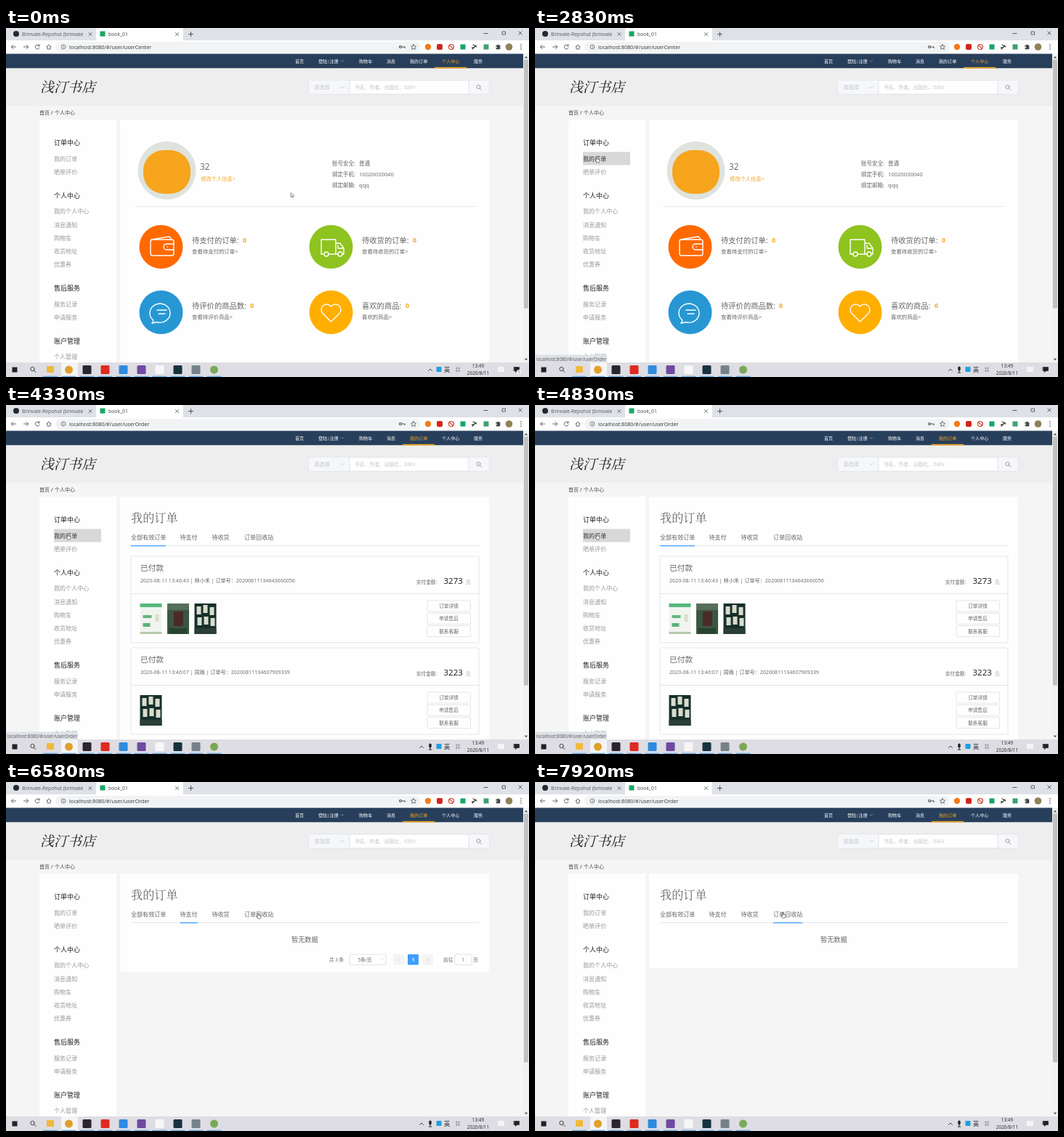
Write an HTML page that moves like this. It is 720 by 480 pixels and loops after 8000 ms.

```html
<!DOCTYPE html>
<html lang="zh-CN">
<head>
<meta charset="utf-8">
<title>书店个人中心</title>
<style>
html, body { margin: 0; width: 100%; height: 100%; overflow: hidden; }
svg { display: block; width: 720px; height: 480px; font-family: "Open Sans", "Noto Sans CJK SC", "Noto Sans CJK", sans-serif; }
text { white-space: pre; }
.serif { font-family: "Noto Serif CJK SC", "Noto Sans CJK SC", serif; }
</style>
</head>
<body>
<svg id="stage" viewBox="0 0 720 480"></svg>
<script>
const LOOP = 8000, STEP = 1000 / 12;
const PAGE = '#f5f5f5', PANEL = '#fefefe', LINE = '#dcdfe4', MUTED = '#999', GREY = '#666', INK = '#222', GOLD = '#f2a51e';

const rect = (x, y, w, h, fill, extra = '') => `<rect x="${x}" y="${y}" width="${w}" height="${h}" fill="${fill}" ${extra}/>`;
const frame = (x, y, w, h, stroke = LINE, r = 1) => rect(x, y, w, h, PANEL, `rx="${r}" stroke="${stroke}" stroke-width=".8"`);
const dot = (x, y, r, fill) => `<circle cx="${x}" cy="${y}" r="${r}" fill="${fill}"/>`;
const path = (d, stroke = '#555', width = .9, fill = 'none') =>
  `<path d="${d}" fill="${fill}" stroke="${stroke}" stroke-width="${width}" stroke-linecap="round" stroke-linejoin="round"/>`;
// y is the vertical middle of the glyphs
const text = (x, y, str, size, fill = INK, extra = '') =>
  `<text x="${x}" y="${(y + size * .37).toFixed(2)}" font-size="${size}" fill="${fill}" ${extra}>${str.replace(/</g, '&lt;')}</text>`;
const middle = 'text-anchor="middle"';
const group = (id, body) => `<g id="${id}">${body}</g>`;
const caret = (x, y, s = 2, c = MUTED) => path(`M${x - s} ${y - s / 2}l${s} ${s}l${s} ${-s}`, c, .7);
const cross = (x, y, s = 2) => path(`M${x - s} ${y - s}l${2 * s} ${2 * s}m0 ${-2 * s}l${-2 * s} ${2 * s}`, '#444', .8);
const lens = (x, y, r, c) => path(`M${x + r} ${y}a${r} ${r} 0 1 0 ${-2 * r} 0a${r} ${r} 0 1 0 ${2 * r} 0M${x + r * .7} ${y + r * .7}l${r} ${r}`, c);

function browser() {
  return rect(0, 0, 720, 17, '#dee1e6') + rect(124, 0, 120, 18, PANEL, 'rx="3"') + rect(0, 17, 720, 18.5, PANEL) +
    rect(68, 19, 503, 14, '#f1f3f4', 'rx="7"') +
    dot(14, 8, 4, '#24292e') + text(22, 8.5, 'Brinvale-Repohut (brinvale', 6.8, '#555') + cross(116, 8.5) +
    rect(129.5, 4.5, 7, 7, '#16a765') + text(141, 8.5, 'book_01', 6.8, '#444') + cross(235.5, 8.5) +
    path('M251.5 8.5h6m-3 -3v6', '#444') +
    path('M658 7.5h5', '#444') + path('M683.5 5h4v4h-4z', '#444', .8) + cross(708, 7, 2.2) +
    path('M13.5 26h-6m2.5 -2.7l-2.7 2.7l2.7 2.7') + path('M24.5 26h6m-2.5 -2.7l2.7 2.7l-2.7 2.7') +
    path('M45.8 24.4a3 3 0 1 0 .2 2.8M46 22.8v2h-2') + path('M56 26l3 -3l3 3M57 25.5v3.5h4v-3.5') +
    path('M82 26a3 3 0 1 0 -6 0a3 3 0 1 0 6 0M79 25.6v1.8M79 24.2v.1', '#666', .8) +
    path('M544.5 26a1.5 1.5 0 1 0 -3 0a1.5 1.5 0 1 0 3 0h4.5v1.5', '#555', 1.2) +
    path('M561 22.5l1.1 2.3l2.5 .3l-1.8 1.7l.5 2.5l-2.3 -1.2l-2.3 1.2l.5 -2.5l-1.8 -1.7l2.5 -.3z', '#555', .8) +
    dot(581, 26, 4.2, '#f57a18') + rect(593, 22, 8, 8, '#d3261c', 'rx="2"') +
    path('M616.5 26a3.5 3.5 0 1 0 -7 0a3.5 3.5 0 1 0 7 0M610.6 23.6l4.8 4.8', '#c8402c', 1.2) +
    rect(625.5, 22.5, 7, 7, '#12a866') + path('M642 29l5 -5m-4 -1l5 3M641.5 27h3', '#444', 1.3) +
    rect(657.5, 22.5, 7, 7, '#3f9f70') + path('M675 24h1.5a1 1 0 1 1 2 0h1.5v5h-5v-2a1 1 0 1 0 0 -1.5z', '#444', .6, '#444') +
    dot(692.5, 26, 4.8, '#8f8058') + [23, 26, 29].map(y => dot(709, y, .8, '#444')).join('');
}

function siteHeader() {
  const nav = [[398, '首页'], [430, '登陆|注册'], [486, '购物车'], [524, '消息'], [644, '服务']];
  return rect(0, 35.5, 712, 20, '#283f5c') + nav.map(([x, s]) => text(x, 45.5, s, 6.1, '#fff')).join('') +
    caret(463, 45.5, 1.7, '#a0a8b4') + rect(0, 55.5, 712, 51.5, '#eee') +
    text(47, 80.5, '浅汀书店', 19, INK, 'class="serif" font-style="italic"') +
    frame(417, 72, 248, 19) + rect(417.4, 72.4, 55.6, 18.2, '#f5f7fa') + rect(637, 72.4, 27.6, 18.2, '#f5f7fa') +
    path('M473 72v19M637 72v19', LINE, .8) + text(424, 81.5, '请选择', 7.2, '#c0c4cc') + caret(463, 81.5, 2.4, '#b8bcc4') +
    text(480, 81.5, '书名、作者、出版社、ISBN', 6.8, '#c0c4cc') + lens(650.5, 81, 2.6, '#909399') +
    text(46, 116, '首页', 7, '#444') + text(62, 116, '/', 7) + text(67, 116, '个人中心', 7, '#444');
}

function navPair(active) {
  return [[556, '我的订单'], [600, '个人中心']].map(([x, s], i) =>
    text(x, 45.5, s, 6.1, i === active ? GOLD : '#fff') + (i === active ? rect(x - 10, 53.8, 44, 1.7, GOLD) : '')).join('');
}

function sidebar() {
  const heads = [[157.5, '订单中心'], [230.5, '个人中心'], [358, '售后服务'], [431, '账户管理']];
  const items = [[180, '我的订单'], [198, '晒单评价'], [252.5, '我的个人中心'], [271, '消息通知'], [289, '购物车'],
    [307.5, '收货地址'], [325.5, '优惠券'], [380, '服务记录'], [398.5, '申请服务'], [452.5, '个人管理']];
  return rect(46, 126, 106, 334, PANEL) +
    heads.map(([y, s]) => text(66, y, s, 9)).join('') + items.map(([y, s]) => text(66, y, s, 8.05, MUTED)).join('') +
    group('hover', rect(66, 170.5, 65, 18, '#d8d8d8') + text(66, 180, '我的订单', 8.05, '#333'));
}

function userCenter() {
  const icons = [
    'M200 291l24 -4q3 0 3 4M202 291h26q3 0 3 3v16q0 3 -3 3h-26q-3 0 -3 -3v-16q0 -3 3 -3M231 297h-10a4 4 0 0 0 0 8h10M222 301h.2',
    'M438 311h-4v-20h20v20h-10M454 296h6l5 7v8h-2M454 311h3M442 299m2 12a3 3 0 1 0 -6 0a3 3 0 1 0 6 0M463 311a3 3 0 1 0 -6 0a3 3 0 1 0 6 0M457 299v4h8',
    'M203 402a14 13 0 1 1 5 2.500l-7 1.500zM208 388h13M210 393h9',
    'M447.500 404l-12 -12a7.500 7.500 0 0 1 12 -9a7.500 7.500 0 0 1 12 9z'];
  const cards = [
    [213.5, 301, '#ff6900', '待支付的订单', '查看待支付的订单>', 326],
    [447.5, 301, '#8fc31f', '待收货的订单', '查看待收货的订单>', 560],
    [213.5, 391, '#2797d4', '待评价的商品数', '查看待评价商品>', 336],
    [447.5, 391, '#ffaf00', '喜欢的商品', '喜欢的商品>', 550]];
  const info = [['账号安全:', '普通'], ['绑定手机:', '10020030040'], ['绑定邮箱:', 'qqq']];
  return rect(157, 126, 508, 334, PANEL) + dot(221.5, 196, 40, '#dfe3dc') + rect(189, 168, 65, 60, '#f6a51c', 'rx="28"') +
    text(267, 191, '32', 11.8, GREY) + text(268.5, 207, '修改个人信息>', 7.2, GOLD) +
    info.map(([a, b], i) => text(449, 186 + 15 * i, a, 7.5, GREY) + text(486, 186 + 15 * i, b, 7.6, GREY)).join('') +
    path('M177 245.500H648', '#e6e6e6', .8) +
    cards.map(([x, y, c, head, sub, vx], i) => dot(x, y, 30, c) + path(icons[i], '#fff', 1.4) +
      text(x + 42.5, y - 9, head + ':', 10.3, GREY) + text(vx, y - 9, '0', 8.8, GOLD, 'font-weight="700"') +
      text(x + 42.5, y + 6, sub, 7.4, GREY)).join('');
}

function thumb(x, y, kind) {
  if (kind === 0) return rect(x, y, 30, 42, '#f1f4ee') + rect(x, y, 30, 5, '#56b87c') + rect(x + 4, y + 16, 12, 4, '#63b580') +
    rect(x + 21, y + 15, 5, 10, '#dcdccf') + rect(x + 4, y + 27, 10, 5, '#59b17c') + rect(x, y + 39, 30, 3, '#b5c9a8');
  if (kind === 1) return rect(x, y, 30, 42, '#3a5640') + rect(x, y, 30, 9, '#557059') +
    rect(x + 9, y + 11, 13, 20, '#4b2a2a') + rect(x + 3, y + 34, 24, 8, '#294332');
  return rect(x, y, 30, 42, '#17302b') + [[3, 4], [12, 2], [21, 5], [4, 19], [13, 18], [22, 20]].map(([a, b]) =>
    rect(x + a, y + b, 6, 11, '#d9dccc')).join('') + rect(x, y + 34, 30, 8, '#293f36');
}

function order(y, detail, price, kinds) {
  return frame(172, y, 479, 119) + path(`M172 ${y + 51.5}H651`, LINE, .8) + text(185, y + 16.5, '已付款', 10.7, GREY) +
    text(185, y + 33.5, detail, 7.1, GREY) + text(565, y + 35.5, '实付金额：', 6.6, GREY) +
    text(602.5, y + 34, price, 11.5, '#161616') + text(633, y + 35.5, '元', 6.6, MUTED) +
    kinds.map((k, i) => thumb(184.5 + 37.5 * i, y + 65, k)).join('') +
    ['订单详情', '申请售后', '联系客服'].map((s, i) =>
      frame(580, y + 61 + 17.3 * i, 59.5, 15) + text(609.5, y + 68.7 + 17.3 * i, s, 6.7, GREY, middle)).join('');
}

function pager() {
  const box = (x, fill, body) => rect(x, 237, 15, 14.5, fill, 'rx="1"') + body;
  return text(445, 244.5, '共 3 条', 6.5, GREY) + frame(473, 237, 50, 14.5) + text(494, 244.5, '5条/页', 6.5, GREY, middle) +
    caret(517, 244.5, 1.6, '#c0c4cc') + box(533, '#f4f4f5', path('M541.500 242.500l-2 2l2 2', '#c0c4cc', .7)) +
    box(553, '#409eff', text(560.5, 244.5, '1', 6.5, '#fff', middle + ' font-weight="700"')) +
    box(573, '#f4f4f5', path('M579.500 242.500l2 2l-2 2', '#c0c4cc', .7)) + text(602, 244.5, '前往', 6.8, GREY) +
    frame(618, 237, 23, 14.5) + text(629.5, 244.5, '1', 6.5, GREY, middle) + text(643, 244.5, '页', 6.8, GREY);
}

function orderPage() {
  const tabs = [[172, '全部有效订单'], [239.5, '待支付'], [283.5, '待收货'], [328, '订单回收站']];
  return `<rect id="panel" x="157" y="126" width="508" fill="${PANEL}"/>` +
    text(172, 155, '我的订单', 16.2, GREY, 'class="serif"') + tabs.map(([x, s]) => text(x, 182.5, s, 8.05, GREY)).join('') +
    path('M172 193.500H651', '#e4e7ed', 1) + `<rect id="bar" y="193" height="1.3" fill="#409eff"/>` +
    group('orders', order(208, '2020-08-11 13:46:43 | 林小禾 | 订单号：20200811134643660056', '3273', [0, 1, 2]) +
      order(334, '2020-08-11 13:46:07 | 周晚 | 订单号：20200811134607909339', '3223', [2])) +
    group('empty', text(393, 217, '暂无数据', 9.2, GREY)) + group('pager', pager());
}

function taskbar() {
  const apps = [[111.5, '#2b2530'], [136.5, '#df2a20'], [161.5, '#2d8be0'], [186.5, '#6f4aa2'], [211.5, '#f7f7f7'], [236.5, '#17323f'], [261.5, '#76828a']];
  return rect(0, 460, 720, 20, '#dedde3') + rect(76, 460, 23, 20, '#f4f4f7') + rect(8.5, 466.5, 7, 7, '#222') + lens(36.5, 469, 2.7, '#333') +
    rect(56, 465, 10, 9, '#efb93c', 'rx="1"') + dot(86.5, 470, 5.5, '#e0a12c') +
    apps.map(([x, c]) => rect(x - 6, 464, 12, 12, c, 'rx="1.5"')).join('') + dot(286.5, 470, 5.5, '#79a957') +
    [61, 86.5, ...apps.map(a => a[0]), 286.5].map(x => rect(x - 10, 478.7, 20, 1.3, '#5fa8e0')).join('') +
    group('chevron', path('M569.500 471.500l2.500 -2.500l2.500 2.500', '#333')) +
    group('mic', rect(582.3, 465.5, 3.4, 6, '#222', 'rx="1.7"') + path('M584 471.500v2.500m-1.800 0h3.600', '#222')) +
    rect(592.5, 466, 7, 7, '#1f9fe0', 'rx="1"') + text(603, 470, '英', 8.2) +
    path('M619 468h6m-6 3.500h6M620.500 466.500v6.500m3 -6.500v6.500', '#8a8a90', .7) +
    text(650, 465, '13:49', 6.4, INK, middle) + text(650, 474.8, '2020/8/11', 6.4, INK, middle) + rect(677, 466, 9, 7, '#f4f4f6') +
    path('M699.500 466.500h7v5h-3l-2 2v-2h-2z', '#222', .7, '#222') +
    group('badge', dot(706, 473, 3, '#f5f5f5') + text(706, 473, '1', 5, INK, middle));
}

const scrollbar = rect(712, 35.5, 8, 424.5, '#f1f1f1') + rect(713, 43.5, 6, 342, '#c1c1c1') +
  path('M714.500 41l1.500 -2l1.500 2zM714.500 455l1.500 2l1.500 -2z', '#555', .5, '#555');
const status = rect(0, 449.5, 99, 10.5, '#dee1e6', 'rx="1"') + text(2, 455.2, 'localhost:8080/#/user/userOrder', 6.25, '#555');
const arrow = path('M0 0v5.500l1.400 -1.200l1 2l.9 -.4l-.9 -2h1.800z', '#444', .6, '#fff');
const hand = path('M-.600 0v4l-1.400 -.700l1.800 3.700h3.200l.900 -2.500v-1.700l-3.100 -.600v-2.200z', '#333', .6, '#fff');

document.getElementById('stage').innerHTML = rect(0, 0, 720, 480, PAGE) + browser() + text(87, 26, '', 7.2, '#333', 'id="url"') +
  siteHeader() + group('navCenter', navPair(1)) + group('navOrder', navPair(0)) + sidebar() +
  group('center', userCenter()) + group('orderPage', orderPage()) + scrollbar + group('status', status) + taskbar() +
  group('cursor', group('arrow', arrow) + group('hand', hand));

const el = Object.fromEntries([...document.querySelectorAll('[id]')].map(n => [n.id, n]));
const show = (id, on) => el[id].style.display = on ? '' : 'none';
const ease = p => p * p * (3 - 2 * p);

// Each row: time, then the values reached at that time
function track(rows, t) {
  const next = rows.findIndex(r => r[0] > t);
  if (next < 0) return rows[rows.length - 1].slice(1);
  if (next === 0) return rows[0].slice(1);
  const a = rows[next - 1], b = rows[next], p = ease((t - a[0]) / (b[0] - a[0]));
  return a.slice(1).map((v, i) => v + (b[i + 1] - v) * p);
}

const OPEN = 4330, UNPAID = 5920, TRASH = 6920;
const pointer = [[0, 392, 227], [350, 392, 227], [1330, 32, 173], [1750, 32, 173], [2250, 85, 178],
  [5080, 85, 178], [5750, 252, 180], [6050, 252, 180], [6500, 347, 181], [6700, 347, 181], [6900, 341, 180]];
const underline = [[UNPAID, 172, 48], [UNPAID + 300, 239.5, 24.5], [TRASH, 239.5, 24.5], [TRASH + 300, 328, 40]];

function render(time) {
  const t = Math.floor(time / STEP + .05) * STEP;
  const [x, y] = track(pointer, t), [barX, barW] = track(underline, t);
  const onOrders = t >= OPEN, empty = t >= UNPAID, trash = t >= TRASH;
  const overItem = x >= 66 && x <= 131 && y >= 170 && y <= 188 && t > 1750;
  const overTab = onOrders && x > 172 && y > 174;

  el.url.textContent = 'localhost:8080/#/user/' + (onOrders ? 'userOrder' : 'userCenter');
  show('center', !onOrders);
  show('navCenter', !onOrders);
  show('orderPage', onOrders);
  show('navOrder', onOrders);
  show('orders', !empty);
  show('empty', empty);
  show('pager', empty && !trash);
  el.panel.setAttribute('height', !empty ? 334 : trash ? 130 : 135);
  el.bar.setAttribute('x', barX);
  el.bar.setAttribute('width', barW);
  show('hover', overItem);
  show('status', overItem);
  show('hand', overItem || overTab);
  show('arrow', !overItem && !overTab);
  el.cursor.setAttribute('transform', `translate(${x} ${y})`);

  const recording = t >= 400;
  show('mic', recording);
  show('badge', !recording);
  el.chevron.setAttribute('transform', `translate(${recording ? 0 : 12} 0)`);
}

const start = performance.now();
function tick() {
  render((performance.now() - start) % LOOP);
  requestAnimationFrame(tick);
}
tick();
</script>
</body>
</html>
```
